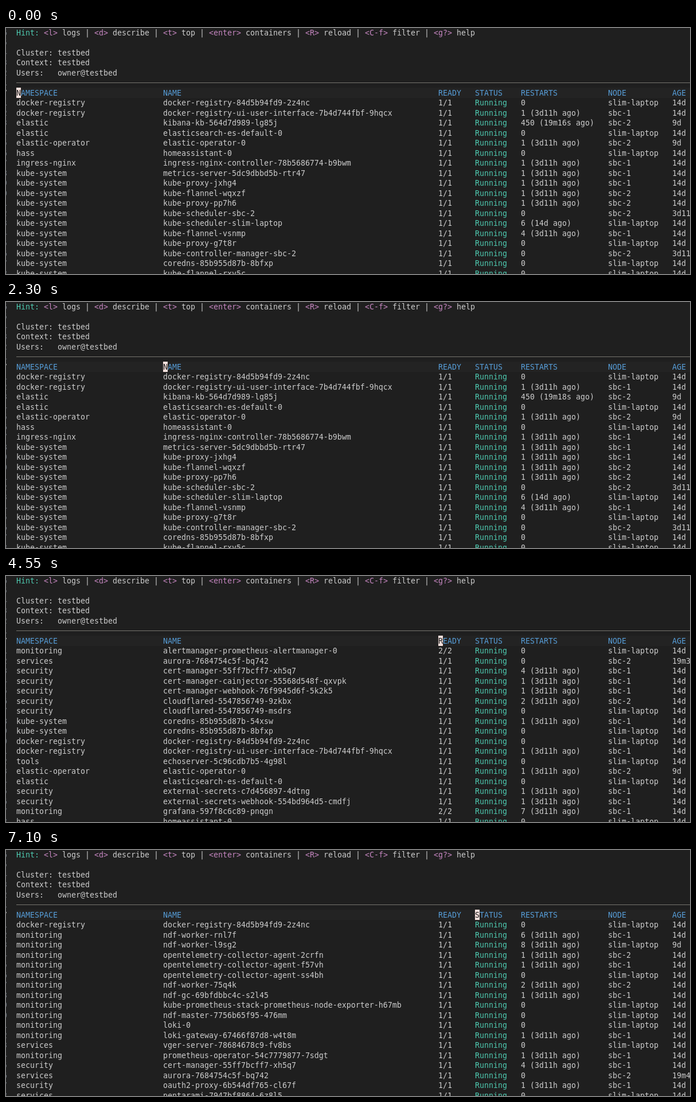
These frames come from a looping animation (1193x429 px, 8 s). An HTML page:

```html
<!DOCTYPE html>
<html lang="en">
<head>
<meta charset="utf-8">
<title>Pod list</title>
<style>
  html, body { margin: 0; width: 100%; height: 100%; overflow: hidden; background: #1f1f1f; }
  #stage {
    position: relative; width: 1193px; height: 429px; overflow: hidden;
    background: #1f1f1f; color: #ccc;
    font: 13.29px/17px "DejaVu Sans Mono", monospace;
    font-variant-ligatures: none;
  }
  .cell { position: absolute; height: 17px; white-space: pre; }
  .green { color: #4ec9b0; }
  .pink { color: #c586c0; }
  .blue { color: #569cd6; }
  .dim { color: #6e7681; }
  .rule { position: absolute; left: 18px; right: 0; top: 95px; height: 1px; background: #77756f; }
  .band { position: absolute; left: 18px; right: 0; top: 104px; height: 18px; background: #232323; }

  /* A dark-on-light copy of the header, clipped to one character cell. */
  .cursor {
    position: absolute; left: 0; top: 104px; width: 1193px; height: 18px;
    background: #f5e0dc; color: #1f1f1f;
    clip-path: inset(0 calc(1185px - var(--x)) 0 var(--x));
    animation: cursor 8s step-end infinite;
  }
  .cursor .cell { color: inherit; }
  @keyframes cursor {
    0% { --x: 18px; }
    19.375% { --x: 58px; }
    21.25% { --x: 66px; }
    25% { --x: 90px; }
    28.75% { --x: 274px; }
    55% { --x: 306px; }
    56.875% { --x: 754px; }
    81.25% { --x: 794px; }
    88.75%, 100% { --x: 818px; }
  }

  .unsorted { animation: unsorted 8s step-end infinite; }
  .by-name { animation: by-name 8s step-end infinite; }
  .by-ready { animation: by-ready 8s step-end infinite; }
  .before { animation: before 8s step-end infinite; }
  .after { animation: after 8s step-end infinite; }
  @keyframes unsorted { 0% { opacity: 1; } 40%, 100% { opacity: 0; } }
  @keyframes by-name { 0% { opacity: 0; } 40% { opacity: 1; } 73.75%, 100% { opacity: 0; } }
  @keyframes by-ready { 0% { opacity: 0; } 73.75%, 100% { opacity: 1; } }
  @keyframes before { 0% { opacity: 1; } 6.25%, 100% { opacity: 0; } }
  @keyframes after { 0% { opacity: 0; } 6.25%, 100% { opacity: 1; } }
</style>
</head>
<body>
<div id="stage"></div>
<script>
const stage = document.getElementById('stage');
const COLUMNS = [18, 274, 754, 818, 898, 1050, 1162];
const HEADER = ['NAMESPACE', 'NAME', 'READY', 'STATUS', 'RESTARTS', 'NODE', 'AGE'];
const HEADER_ROW = 6;
const NODES = { a: 'sbc-1', b: 'sbc-2', c: 'slim-laptop' };

// Fields: namespace, name, restarts[/when], node, age, ready (1/1 if absent)
const TABLES = {
  unsorted: `docker-registry docker-registry-84d5b94fd9-2z4nc 0 c 14d
docker-registry docker-registry-ui-user-interface-7b4d744fbf-9hqcx 1 a 14d
elastic kibana-kb-564d7d989-lg85j 450/19m1_s b 9d
elastic elasticsearch-es-default-0 0 c 14d
elastic-operator elastic-operator-0 1 b 9d
hass homeassistant-0 0 c 14d
ingress-nginx ingress-nginx-controller-78b5686774-b9bwm 1 a 14d
kube-system metrics-server-5dc9dbbd5b-rtr47 1 a 14d
kube-system kube-proxy-jxhg4 1 a 14d
kube-system kube-flannel-wqxzf 1 b 14d
kube-system kube-proxy-pp7h6 1 b 14d
kube-system kube-scheduler-sbc-2 0 b 3d11h
kube-system kube-scheduler-slim-laptop 6/14d c 14d
kube-system kube-flannel-vsnmp 4 a 14d
kube-system kube-proxy-g7t8r 0 c 14d
kube-system kube-controller-manager-sbc-2 0 b 3d11h
kube-system coredns-85b955d87b-8bfxp 0 c 14d
kube-system kube-flannel-rxv5c 0 c 14d`,
  'by-name': `monitoring alertmanager-prometheus-alertmanager-0 0 c 14d 2/2
services aurora-7684754c5f-bq742 0 b 19m39s
security cert-manager-55ff7bcff7-xh5q7 4 a 14d
security cert-manager-cainjector-55568d548f-qxvpk 1 a 14d
security cert-manager-webhook-76f9945d6f-5k2k5 1 a 14d
security cloudflared-5547856749-9zkbx 2 b 14d
security cloudflared-5547856749-msdrs 0 c 14d
kube-system coredns-85b955d87b-54xsw 1 a 14d
kube-system coredns-85b955d87b-8bfxp 0 c 14d
docker-registry docker-registry-84d5b94fd9-2z4nc 0 c 14d
docker-registry docker-registry-ui-user-interface-7b4d744fbf-9hqcx 1 a 14d
tools echoserver-5c96cdb7b5-4g98l 0 c 14d
elastic-operator elastic-operator-0 1 b 9d
elastic elasticsearch-es-default-0 0 c 14d
security external-secrets-c7d456897-4dtng 1 a 14d
security external-secrets-webhook-554bd964d5-cmdfj 1 a 14d
monitoring grafana-597f8c6c89-pnqgn 7 a 14d 2/2
hass homeassistant-0 0 c 14d`,
  'by-ready': `docker-registry docker-registry-84d5b94fd9-2z4nc 0 c 14d
monitoring ndf-worker-rnl7f 6 a 14d
monitoring ndf-worker-l9sg2 8 c 9d
monitoring opentelemetry-collector-agent-2crfn 1 b 14d
monitoring opentelemetry-collector-agent-f57vh 1 a 14d
monitoring opentelemetry-collector-agent-ss4bh 0 c 14d
monitoring ndf-worker-75q4k 2 b 14d
monitoring ndf-gc-69bfdbbc4c-s2l45 1 a 14d
monitoring kube-prometheus-stack-prometheus-node-exporter-h67mb 0 c 14d
monitoring ndf-master-7756b65f95-476mm 0 c 14d
monitoring loki-0 0 c 14d
monitoring loki-gateway-67466f87d8-w4t8m 1 a 14d
services vger-server-78684678c9-fv8bs 0 c 14d
monitoring prometheus-operator-54c7779877-7sdgt 1 a 14d
security cert-manager-55ff7bcff7-xh5q7 4 a 14d
services aurora-7684754c5f-bq742 0 b 19m45s
security oauth2-proxy-6b544df765-cl67f 1 a 14d
services pentarami-7947bf8864-6z8l5 0 c 14d`
};

function box(className, parent = stage) {
  const el = document.createElement('div');
  el.className = className;
  parent.append(el);
  return el;
}

const rowTop = row => Math.floor(row * 17.5);

function cell(parent, x, y, text, className = '') {
  const el = box('cell ' + className, parent);
  el.style.left = x + 'px';
  el.style.top = y + 'px';
  el.textContent = text;
}

function hint() {
  const keys = [['l', 'logs'], ['d', 'describe'], ['t', 'top'], ['enter', 'containers'],
    ['R', 'reload'], ['C-f', 'filter'], ['g?', 'help']];
  cell(stage, 18, 0, 'Hint:', 'green');
  let x = 66;
  keys.forEach(([key, action], i) => {
    const label = `<${key}>`;
    const rest = action + (i < keys.length - 1 ? ' | ' : '');
    cell(stage, x, 0, label, 'pink');
    x += (label.length + 1) * 8;
    cell(stage, x, 0, rest);
    x += rest.length * 8;
  });
}

function lineNumbers() {
  for (let row = 0; row < 25; row++) {
    const current = row === HEADER_ROW;
    const digit = current ? 7 : Math.abs(row - HEADER_ROW) % 10;
    cell(stage, -6, rowTop(row), digit, current ? '' : 'dim');
  }
}

function header(parent, y) {
  HEADER.forEach((title, i) => cell(parent, COLUMNS[i], y, title, 'blue'));
}

function table(id, source) {
  const group = box(id);
  source.split('\n').forEach((line, i) => {
    const [space, name, restarts, node, age, ready = '1/1'] = line.split(' ');
    const [count, when = '3d11h'] = restarts.split('/');
    const history = count === '0' ? count : `${count} (${when.replace('_', ' ')} ago)`;
    [space, name, ready, 'Running', history, NODES[node], age].forEach((text, c) =>
      cell(group, COLUMNS[c], rowTop(HEADER_ROW + 1 + i), text, c === 3 ? 'green' : ''));
  });
  return group;
}

hint();
lineNumbers();
['Cluster: testbed', 'Context: testbed', 'Users:   owner@testbed'].forEach((text, i) =>
  cell(stage, 18, rowTop(2 + i), text));
box('rule');
box('band');
header(stage, rowTop(HEADER_ROW));
header(box('cursor'), rowTop(HEADER_ROW) - 104);

const groups = Object.entries(TABLES).map(([id, source]) => table(id, source));
cell(groups[0], 970, rowTop(9), '6', 'before');
cell(groups[0], 970, rowTop(9), '8', 'after');
</script>
</body>
</html>
```
